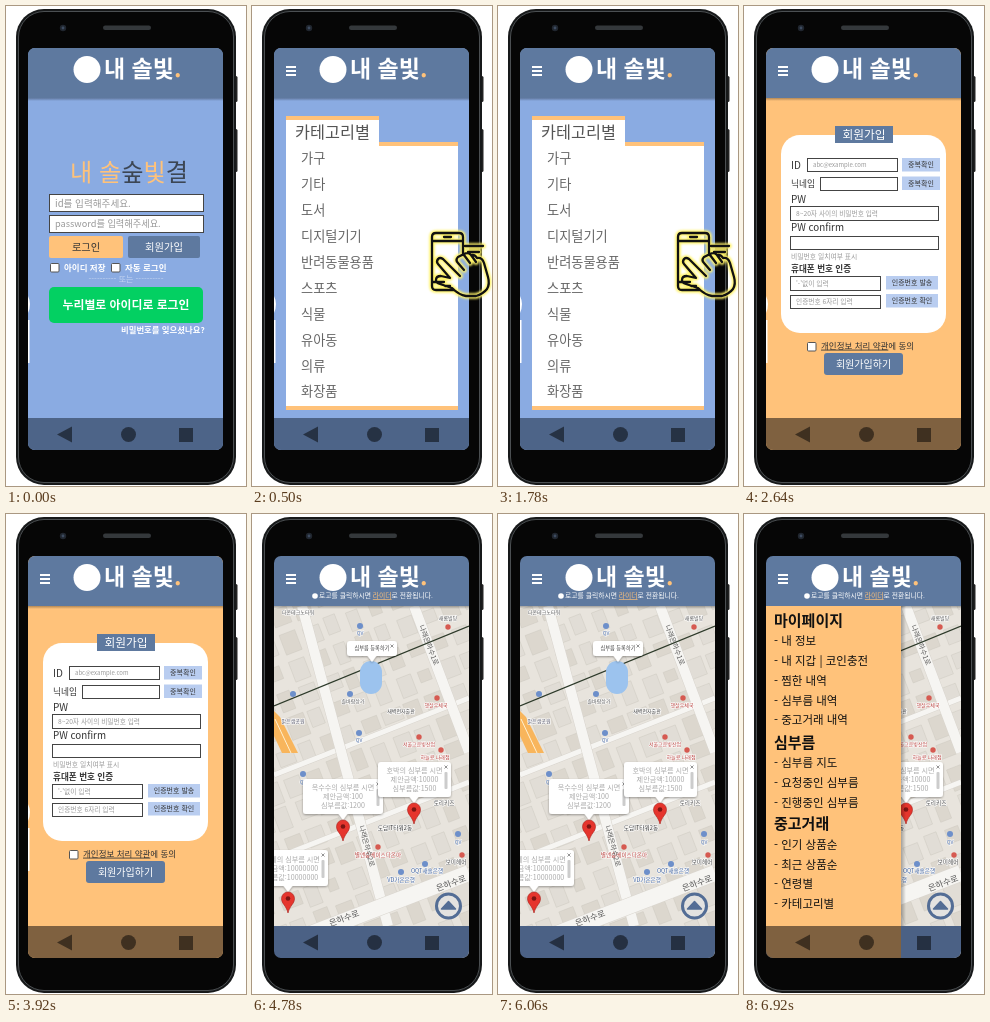
Recreate the animation shown at these times as an HTML page. Size 240 by 480 pixels, loop 8000 ms.

```html
<!DOCTYPE html>
<html lang="ko">
<head>
<meta charset="utf-8">
<style>
html, body { margin: 0; width: 100%; height: 100%; overflow: hidden; background: #fff; }
svg { display: block; width: 100vw; height: 100vh; }
text { font-family: "Noto Sans CJK KR", "Noto Sans CJK", "Noto Sans KR", sans-serif; white-space: pre; }
</style>
</head>
<body>
<svg id="stage" viewBox="0 0 240 480" xmlns="http://www.w3.org/2000/svg"></svg>
<script>
const BLUE = '#5e799f', SKY = '#8aabe2', ORANGE = '#ffc27a', INK = '#333', GRAY = '#999';

// x, vertical centre, size, content
const text = (x, y, size, s, fill = INK, more = '') =>
  `<text x="${x}" y="${y + size * 0.37}" font-size="${size}" fill="${fill}" ${more}>${s}</text>`;
const mid = (x, y, size, s, fill, more = '') => text(x, y, size, s, fill, 'text-anchor="middle" ' + more);
const box = (x, y, x2, y2, fill, more = '') =>
  `<rect x="${x}" y="${y}" width="${x2 - x}" height="${y2 - y}" fill="${fill}" ${more}/>`;
const path = (d, fill, more = '') => `<path d="${d}" fill="${fill}" ${more}/>`;
const dot = (x, y, r, fill, more = '') => `<circle cx="${x}" cy="${y}" r="${r}" fill="${fill}" ${more}/>`;
const line = (d, color, w, more = '') => path(d, 'none', `stroke="${color}" stroke-width="${w}" ${more}`);
const bold = 'font-weight="700"', medium = 'font-weight="500"', light = 'font-weight="300"';

const field = (x, y, x2, y2, hint = '', size = 6.7) =>
  box(x + .5, y + .5, x2 - .5, y2 - .5, '#fff', 'stroke="#444"') +
  text(x + 6, (y + y2) / 2, size, hint, GRAY);
const button = (x, y, x2, y2, fill, label, size, color = '#fff', r = 0, weight = medium) =>
  box(x, y, x2, y2, fill, `rx="${r}"`) + mid((x + x2) / 2, (y + y2) / 2, size, label, color, weight);
const check = (x, y) => box(x + .5, y + .5, x + 9, y + 9, '#fff', 'stroke="#555" rx="1"');

const phone = () =>
  box(226, 70, 231.5, 96, '#222', 'rx="1.5"') + box(226, 123, 231.5, 166, '#222', 'rx="1.5"') +
  box(10, 3, 230, 479, '#17191a', 'rx="28"') +
  box(12.5, 5.5, 227.5, 476.5, '#060606', 'rx="25.5" stroke="#4b4f52"') +
  box(97, 19.5, 145, 24, '#34383b', 'rx="2.2"') +
  dot(57, 22, 3.2, '#20262f') + dot(57, 22, 1.4, '#3d4b60');

const header = menu =>
  box(22, 92, 217, 95, 'url(#drop)') + box(22, 42, 217, 92, BLUE) +
  dot(81, 63.5, 13.5, '#fff') +
  text(98, 62.5, 23, `내 솔빛<tspan fill="${ORANGE}">.</tspan>`, '#fff', bold) +
  (menu ? line('M34 61h10M34 65h10M34 69h10', '#fff', 2) : '');

const navBar = fill =>
  box(22, 412, 217, 444, fill) +
  `<g opacity=".5">${path('M51 428.5L66 420.5V436.5Z', '#000')}${dot(122.5, 428.5, 7.5, '#000')}${box(173, 422, 187, 436, '#000')}</g>`;

const glint = () => path('M22 290q4 8 0 17zM22 314h1.5v43H22z', '#fff');

function login() {
  const hi = s => `<tspan fill="${ORANGE}">${s}</tspan>`;
  return box(22, 42, 217, 444, SKY) + header(false) +
    text(64, 166, 24.2, `${hi('내 솔')}숲${hi('빛')}결`, '#3c4654', medium) +
    field(43, 188, 198, 206, 'id를 입력해주세요.', 9.6) +
    field(43, 209, 198, 227, 'password를 입력해주세요.', 9.2) +
    button(43, 230, 117, 252, ORANGE, '로그인', 10.2, '#333', 2) +
    button(122, 230, 194, 252, BLUE, '회원가입', 10.3, '#fff', 2) +
    check(44, 257) + text(58, 261.5, 8.5, '아이디 저장', '#fff', bold) +
    check(105, 257) + text(119, 261.5, 8.5, '자동 로그인', '#fff', bold) +
    mid(120, 273, 8, '---------- 또는 ----------', '#c3d4f1') +
    button(43, 281, 197, 317, '#03d062', '누리별로 아이디로 로그인', 11.9, '#fff', 5, bold) +
    text(115, 324, 8.4, '비밀번호를 잊으셨나요?', '#fff', bold) +
    glint() + navBar('#4d6488');
}

function swipeIcon() {
  const device = 'M211 249V231q0-4-4-4H184q-4 0-4 4v49q0 4 4 4h18M180 235h31M180 276h12M192 231h7M193 280h5';
  const hand = 'M208 270L191 253q-3-2-5 0-2 3 0 5l12 14-9-2q-5 0-5 4 0 3 4 4l12 4q7 7 14 8h10q7-2 11-7 3-5 1-12l-4-14q-2-6-7-5-2-4-6-3-3-3-7-1l-6 3q-3 3 0 6l6 7M212 249l6 8M219 249l5 7';
  const shapes = device + hand + 'M213 240h18M216 246h11';
  const stroke = (c, w, more = '') => line(shapes, c, w, 'stroke-linejoin="round" stroke-linecap="round" ' + more);
  return stroke('#fff36a', 5.5, 'filter="url(#glow)"') + stroke('#111', 2.3);
}

function categories() {
  const names = ['가구', '기타', '도서', '디지털기기', '반려동물용품', '스포츠', '식물', '유아동', '의류', '화장품'];
  return box(22, 42, 217, 444, SKY) + header(true) +
    box(34, 110, 127, 140, '#fff') + box(34, 136, 206, 404, '#fff') +
    box(34, 110, 127, 114, ORANGE) + box(127, 136, 206, 140, ORANGE) + box(34, 400, 206, 404, ORANGE) +
    text(43, 126, 16.3, '카테고리별', '#555', light) +
    names.map((n, i) => text(49, 152.5 + i * 25.9, 13.2, n, '#666', light)).join('') +
    glint() + navBar('#4d6488');
}

function signUp() {
  const pale = (x, y, x2, label) => button(x, y, x2, y + 13.5, '#b9cdf0', label, 7, INK);
  return box(22, 42, 217, 444, ORANGE) + header(true) +
    box(37, 129, 202, 327, '#fff', 'rx="19"') +
    button(91, 120, 149, 137, BLUE, '회원가입', 11.7) +
    text(47, 159.5, 10, 'ID', INK, medium) + field(63, 152, 154, 166, 'abc@example.com', 6) + pale(158, 152, 196, '중복확인') +
    text(47, 178, 8.7, '닉네임') + field(76, 171, 154, 185) + pale(158, 170.5, 196, '중복확인') +
    text(47, 193, 10, 'PW', INK, medium) + field(46, 200, 195, 215, '8~20자 사이의 비밀번호 입력') +
    text(47, 221.5, 9.8, 'PW confirm', INK, medium) + field(46, 230, 195, 244) +
    text(47, 250.5, 6.8, '비밀번호 일치여부 표시', GRAY) +
    text(47, 263, 8.6, '휴대폰 번호 인증', INK, bold) +
    field(46, 270, 137, 285, "'-'없이 입력") + pale(142, 270, 194, '인증번호 발송') +
    field(46, 289, 137, 303, '인증번호 6자리 입력') + pale(142, 288, 194, '인증번호 확인') +
    check(63, 336) +
    text(77, 339.5, 8.5, '<tspan text-decoration="underline">개인정보 처리 약관</tspan>에 동의') +
    button(80, 347, 159, 369, BLUE, '회원가입하기', 10, '#fff', 3) +
    glint() + navBar('#7f6140');
}

function bubble(x, y, x2, y2, tip, lines, size, color) {
  const step = 9, top = (y + y2) / 2 - (lines.length - 1) * step / 2, cx = x2 - 5, cy = y + 5;
  return `<g filter="url(#soft)">${box(x, y, x2, y2, '#fff', 'rx="3"')}${path(`M${tip - 5} ${y2 - 1}h10l-5 7z`, '#fff')}</g>` +
    lines.map((s, i) => mid((x + x2) / 2, top + i * step, size, s, color)).join('') +
    (lines.length > 1 ? box(cx - 1.5, y + 10, cx + 1.5, y2 - 8, '#ccc', 'rx="1"') : '') +
    line(`M${cx - 1.5} ${cy - 1.5}l3 3m0 -3l-3 3`, '#666', .7);
}

const pin = (x, y) =>
  path(`M${x} ${y + 21}C${x - 2} ${y + 13} ${x - 6.5} ${y + 12} ${x - 6.5} ${y + 6.5}a6.5 6.5 0 0 1 13 0C${x + 6.5} ${y + 12} ${x + 2} ${y + 13} ${x} ${y + 21}z`,
    '#e5352d', 'stroke="#a91f1a" stroke-width=".6"') + dot(x, y + 6.5, 2.3, '#7c1512');

function streets() {
  let seed = 7, blocks = '';
  const rnd = () => (seed = seed * 16807 % 2147483647) / 2147483647;
  for (let x = -180; x < 200; x += 23)
    for (let y = -210; y < 220; y += 27)
      blocks += box(x + rnd() * 4, y + rnd() * 4, x + 13 + rnd() * 8, y + 15 + rnd() * 9,
        rnd() < .5 ? '#dcd7ce' : '#e1ddd6', 'stroke="#cfcac1" stroke-width=".5"');
  const road = (d, w) => line(d, '#d8d4cd', w + 1) + line(d, '#f6f5f2', w);
  return box(22, 92, 217, 412, '#e8e4dd') + `<g transform="translate(120 252) rotate(-21)">${blocks}</g>` +
    road('M22 261L217 184M22 345L217 268', 5) +
    road('M162 92L217 238M50 92L136 412', 10) + road('M22 434L217 359', 16) +
    path('M22 197L28 203 46 239H30L22 222z', '#f8b55c') + line('M23 205L39 239', '#fff0d0', 1) +
    line('M22 192L217 112', '#2d3a2a', 1.2);
}

function map() {
  const labels = [
    [46, 98, 5, '다온테크노타워', '#555'], [196, 104, 5, '새롬빌딩', '#555'], [41, 207, 5, '맑은샘공원', '#556'],
    [101, 187, 5, '솔바람상가', '#555'], [149, 197, 5, '새벽전자출판', '#444'], [184, 191, 5, '햇살우체국', '#b8433f'],
    [167, 230, 5, '서울고운빛산업', '#b8433f'], [183, 243, 5, '하늘콩 나래점', '#b8433f'], [192, 289, 5.6, '토리키즈', '#444'],
    [143, 314, 5.7, '도담IT타워2동', '#333'], [126, 341, 5.6, '별앤숲베이스다온아', '#b8433f'],
    [175, 357, 5.6, 'OQT새솔은행', '#3d5f9a'], [149, 366, 5.6, 'VD가온은행', '#3d5f9a'], [204, 348, 5.6, '보미헤어', '#444'],
    [108, 119, 5, 'QV', '#3d5f9a'], [107, 226, 5, 'QV', '#3d5f9a'], [51, 268, 5, 'QV', '#3d5f9a'], [206, 328, 5, 'QV', '#3d5f9a'],
  ];
  const spots = [[108, 112], [98, 180], [107, 219], [51, 260], [206, 320], [173, 350], [149, 358], [41, 180]];
  const shops = [[196, 113], [185, 184], [167, 223], [189, 236], [126, 333], [210, 341]];
  const street = (x, y, a, s, size = 7) =>
    `<g transform="translate(${x} ${y}) rotate(${a})">${mid(0, 0, size, s, '#555')}</g>`;
  return streets() +
    spots.map(([x, y]) => dot(x, y, 3, '#6d8fca')).join('') + shops.map(([x, y]) => dot(x, y, 2.7, '#d65a51')).join('') +
    labels.map(l => mid(...l, 'stroke="#fff" stroke-width="1.2" paint-order="stroke"')).join('') +
    street(177, 131, 69, '나래은하수1로') + street(115, 332, 75, '나래은하수2로') +
    street(92, 404, -21, '은하수로', 8.5) + street(199, 369, -21, '은하수로', 8.5) +
    box(108, 147, 130, 180, '#9cc3ee', 'rx="11"') +
    bubble(95, 127, 145, 142, 120, ['심부름 등록하기'], 5.2, '#444') +
    bubble(51, 265, 131, 300, 91, ['옥수수의 심부름 시면', '제안금액:100', '심부름값:1200'], 7.1, '#aaa') + pin(91, 306) +
    bubble(126, 248, 199, 283, 162, ['호박의 심부름 시면', '제안금액:10000', '심부름값:1500'], 7.1, '#aaa') + pin(162, 289) +
    bubble(-3, 336, 76, 372, 36, ['나그네의 심부름 시면', '제안금액:10000000', '심부름값:10000000'], 7.1, '#aaa') + pin(36, 378) +
    dot(196.5, 392, 12, '#e3e2e0', 'stroke="#536d95" stroke-width="3"') +
    path('M189.5 395L196.5 387.5 203.5 395z', '#536d95', 'stroke="#536d95" stroke-width="1.5" stroke-linejoin="round"') +
    header(true) + dot(63, 82, 2.8, '#fff') +
    text(67, 81.5, 6.8, `로고를 클릭하시면 <tspan fill="${ORANGE}" text-decoration="underline">라이더</tspan>로 전환됩니다.`, '#fff', medium) +
    navBar('#4b6185');
}

function drawer() {
  const groups = [
    ['마이페이지', 106, [127, 147, 167, 187, 206], ['내 정보', '내 지갑 | 코인충전', '찜한 내역', '심부름 내역', '중고거래 내역']],
    ['심부름', 228, [249, 268.5, 289], ['심부름 지도', '요청중인 심부름', '진행중인 심부름']],
    ['중고거래', 309, [331, 351, 370, 390], ['인기 상품순', '최근 상품순', '연령별', '카테고리별']],
  ];
  return map() + box(157, 92, 162, 412, 'url(#side)') + box(22, 92, 157, 412, ORANGE) +
    groups.map(([title, y, rows, items]) => text(30, y, 15, title, '#111', bold) +
      items.map((s, i) => text(30, rows[i], 11.5, '- ' + s, '#111', medium)).join('')).join('') +
    `<g clip-path="url(#left)">${navBar('#7f6140')}</g>`;
}

const shade = (id, axis) =>
  `<linearGradient id="${id}" x1="0" y1="0" ${axis}><stop stop-opacity=".3"/><stop offset="1" stop-opacity="0"/></linearGradient>`;
const scenes = [[0, login], [500, categories], [2640, signUp], [4780, map], [6920, drawer]];
const stage = document.getElementById('stage');
stage.innerHTML = `<defs>${shade('drop', 'x2="0" y2="1"')}${shade('side', 'x2="1" y2="0"')}
  <clipPath id="screen">${box(22, 42, 217, 444, '#000', 'rx="7"')}</clipPath>
  <clipPath id="left">${box(22, 412, 157, 444, '#000')}</clipPath>
  <filter id="glow"><feGaussianBlur stdDeviation=".8"/></filter>
  <filter id="soft"><feDropShadow dx="0" dy="1" stdDeviation="1.2" flood-opacity=".35"/></filter></defs>` +
  phone() + `<g clip-path="url(#screen)">${scenes.map(([, draw]) => `<g class="scene">${draw()}</g>`).join('')}</g>` +
  `<g id="swipe">${swipeIcon()}</g>`;

const layers = [...document.querySelectorAll('.scene')], swipe = document.getElementById('swipe');
const start = performance.now();
function tick() {
  const t = (performance.now() - start) % 8000;
  const now = scenes.filter(([at]) => at <= t).length - 1;
  layers.forEach((g, i) => { g.style.display = i === now ? '' : 'none'; });
  swipe.style.display = now === 1 ? '' : 'none';
  requestAnimationFrame(tick);
}
tick();
</script>
</body>
</html>
```
